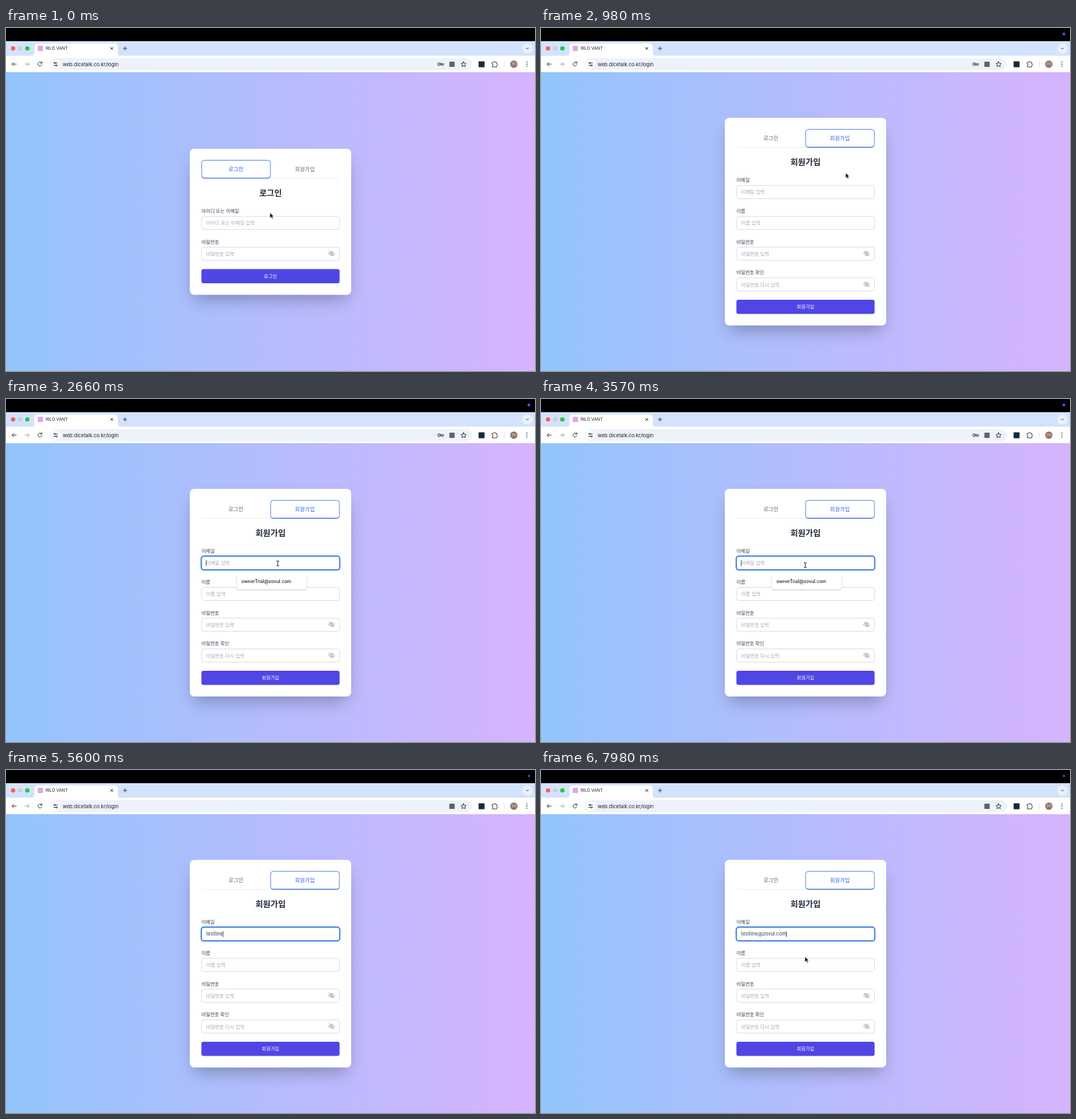
Animation, 800 px wide and 520 px high, one loop 8000 ms. Source, as an HTML page:

```html
<!DOCTYPE html>
<html lang="ko">
<head>
<meta charset="utf-8">
<title>Login</title>
<style>
  html, body { margin: 0; width: 100%; height: 100%; overflow: hidden; background: #000; }
  svg { display: block; width: 100vw; height: 100vh; }
  text { font-family: Inter, "Noto Sans CJK KR", "Noto Sans CJK", sans-serif; white-space: pre; }
  .icon { fill: none; stroke: #3c4043; stroke-width: 1; stroke-linecap: round; stroke-linejoin: round; }
</style>
</head>
<body>
<svg id="stage" viewBox="0 0 800 520"></svg>
<script>
const LOOP = 8000, STEP = 70;
const SWITCH = 980, FIRST_KEY = 4060, POINTER_BACK = 7700;
const FIELD_CLICKS = [1460, 3600];
const EMAIL = 'testline@zovul.com';
const KEY_TIMES = [4060, 4200, 4340, 4620, 5180, 5320, 5460, 5600, 5880,
                   6160, 6300, 6510, 6650, 6790, 7000, 7210, 7350, 7490];
// Pointer path: time, x, y
const PATH = [[70, 399, 280], [840, 460.5, 219.5], [980, 460.5, 219.5], [1470, 381.5, 251.3],
              [2100, 381.5, 251.3], [2660, 411, 249.2], [3710, 399, 252],
              [7630, 399, 252], [7980, 399, 283]];

const rect = (x, y, w, h, r, fill, extra = '') =>
  `<rect x="${x}" y="${y}" width="${w}" height="${h}" rx="${r}" fill="${fill}" ${extra}/>`;
const circle = (x, y, r, fill, extra = '') => `<circle cx="${x}" cy="${y}" r="${r}" fill="${fill}" ${extra}/>`;
const icon = (d, extra = '') => `<path class="icon" d="${d}" ${extra}/>`;
// Text is placed by the vertical middle of its letters.
const label = (str, x, y, size, fill, weight = 400, anchor = 'start', extra = '') =>
  `<text x="${x}" y="${y + size * .37}" font-size="${size}" fill="${fill}" font-weight="${weight}" text-anchor="${anchor}" ${extra}>${str}</text>`;

function browser() {
  return rect(0, 0, 800, 20, 0, '#000') +
    rect(0, 20, 800, 24, 0, '#d3e3fd') +
    circle(10.7, 31, 3.3, '#fe5f57') + circle(21.5, 31, 3.3, '#cfced8') + circle(32.3, 31, 3.3, '#28c840') +
    '<path d="M39 42Q43 42 43 38V28.500Q43 23.500 48 23.500H164Q169 23.500 169 28.500V38Q169 42 173 42Z" fill="#fff"/>' +
    rect(48, 27, 8, 8, 1, '#dfa6e6') +
    label('RILO VANT', 60, 31, 6.4, '#202124') +
    icon('M158.200 29.200l3.600 3.600m0-3.600l-3.600 3.600M177.300 31h5.400M180 28.300v5.400') +
    circle(788.5, 31, 7.7, '#e9f1fe') + icon('M786.700 30.200l1.800 1.800 1.800-1.800') +
    rect(0, 42, 800, 25, 0, '#fff') +
    icon('M15.500 54.800H9.200m2.800-2.800l-2.800 2.800 2.800 2.800') +
    icon('M28.700 54.800H35m-2.800-2.800l2.800 2.800-2.800 2.800', 'style="stroke:#a3a6ab"') +
    icon('M54 53a3 3 0 1 0 .3 2.600M54.200 51v2.200H52') +
    rect(66, 45.8, 639, 18, 9, '#edf2fb') +
    circle(75, 54.8, 7, '#fff') +
    icon('M72 53h.6m2.400 0h3M72 56.700h3m2.400 0h.6') +
    circle(73.8, 53, 1.1, 'none', 'class="icon"') + circle(76.3, 56.7, 1.1, 'none', 'class="icon"') +
    label('web.dicetalk.co.kr/login', 85.7, 54.8, 7.5, '#202124') +
    `<g id="key">${circle(655, 54.8, 2.2, 'none', 'class="icon"')}${circle(655, 54.8, .7, '#3c4043')}${icon('M657.400 54h4.400v1.600h-1v1.200h-1.800v-1.200h-1.600')}</g>` +
    rect(670.5, 51, 8, 8, 1, '#5f6368') +
    icon('M692 51l1.200 2.600 2.800.3-2.100 1.900.6 2.800-2.500-1.400-2.500 1.400.6-2.800-2.100-1.900 2.800-.3z') +
    rect(714.7, 50.5, 9, 9, .8, '#172b3a') +
    icon('M735.500 52h2.200a1.200 1.200 0 0 1 2.400 0h2v2.300a1.200 1.200 0 0 1 0 2.400V59h-6.600v-2.200a1.200 1.200 0 0 0 0-2.400z') +
    rect(753, 51, .8, 8, 0, '#cbdcf8') +
    circle(768, 54.8, 5.6, '#927469') + label('온비', 768, 54.8, 4.2, '#f3e9e4', 400, 'middle') +
    [51.6, 54.8, 58].map(y => circle(787.7, y, .85, '#3c4043')).join('');
}

const hiddenEye = y => icon(`M488 ${y}Q492.500 ${y - 6} 497 ${y}Q492.500 ${y + 6} 488 ${y}M488.500 ${y - 4}l8 8`,
  'style="stroke:#8b919c;stroke-width:.8"') + circle(492.5, y, 1.4, 'none', 'stroke="#8b919c" stroke-width=".8"');

function tab(name, x, top, active) {
  const text = (fill, weight) => label(name, x + 52.2, top + 14, 8.1, fill, weight, 'middle');
  if (!active) return rect(x, top + 27.3, 104.3, .7, 0, '#e2e4e9') + text('#636771', 500);
  return rect(x + .4, top + .3, 104, 27.2, 4, '#fff', 'stroke="#4a7bdc" stroke-width=".9"') +
    `<path d="M${x + 1} ${top + 25.4}q1 2 3.500 2h95.500q2.500 0 3.500-2" fill="none" stroke="#3a6fd9" stroke-width="1"/>` +
    text('#2563eb', 500);
}

function card(id, top, title, fields) {
  const height = 128 + fields.length * 46.7, buttonTop = top + 89 + fields.length * 46.7;
  let out = rect(284, top + 19.5, 232, height - 12, 6, '#000', 'opacity=".27" filter="url(#blur)"') +
    rect(278, top, 244, height, 6.5, '#fff') +
    tab('로그인', 295.5, top + 17.2, title === '로그인') +
    tab('회원가입', 399.8, top + 17.2, title === '회원가입') +
    label(title, 400, top + 67.2, 12.4, '#1f2937', 700, 'middle');
  fields.forEach(([name, hint], i) => {
    const y = top + 94.3 + i * 46.7;
    out += label(name, 295.7, y, 7.2, '#374151', 500) +
      rect(295.8, y + 8.3, 208.6, 20, 3.6, '#fff', 'stroke="#d1d5db" stroke-width=".8"') +
      label(hint, 302.7, y + 18.2, 7.3, '#a2a8b3', 400, 'start', i ? '' : `id="${id}Hint"`);
    if (name.startsWith('비밀번호')) out += hiddenEye(y + 18);
  });
  return `<g id="${id}">${out}` + rect(295.5, buttonTop, 209, 21.6, 3.3, '#4f46e5') +
    label(title, 400, buttonTop + 10.8, 7.2, '#fff', 500, 'middle') + '</g>';
}

const stage = document.getElementById('stage');
stage.innerHTML = `
  <defs>
    <linearGradient id="sky"><stop stop-color="#93c5fd"/><stop offset="1" stop-color="#d6b3fe"/></linearGradient>
    <filter id="blur" x="-30%" y="-30%" width="160%" height="160%"><feGaussianBlur stdDeviation="13"/></filter>
    <filter id="soft" x="-20%" y="-30%" width="140%" height="170%"><feDropShadow dx="0" dy="1" stdDeviation="1.3" flood-opacity=".3"/></filter>
  </defs>
  ${rect(0, 67, 800, 453, 0, 'url(#sky)')}
  ${browser()}
  ${circle(790.8, 9, 2.2, '#5844ee', 'id="dot"')}
  ${card('login', 183, '로그인', [['아이디 또는 이메일', '아이디 또는 이메일 입력'], ['비밀번호', '비밀번호 입력']])}
  <g id="hover">
    ${rect(400.4, 200.6, 103.7, 27, 4, '#fff', 'stroke="#1c68c0" stroke-width="1.3"')}
    ${label('회원가입', 452, 214.2, 8.1, '#4b5563', 500, 'middle')}
  </g>
  ${card('signup', 136.2, '회원가입', [['이메일', '이메일 입력'], ['이름', '이름 입력'],
    ['비밀번호', '비밀번호 입력'], ['비밀번호 확인', '비밀번호 다시 입력']])}
  <g id="focus">
    ${rect(295.3, 238.2, 209.4, 21, 3.8, 'none', 'stroke="#3576e6" stroke-width="1.8"')}
    ${label('', 302.7, 248.7, 7.4, '#374151', 400, 'start', 'id="typed"')}
    ${rect(302.5, 244.3, .8, 9, 0, '#222', 'id="caret"')}
  </g>
  <g id="suggestion">
    ${rect(349.3, 263, 105, 25.3, 3, '#fff', 'filter="url(#soft)"')}
    ${rect(346, 260.5, 112, 5.5, 0, '#fff')}
    ${label('ownerTrial@zovul.com', 356, 276, 6.9, '#202124', 500)}
  </g>
  <g id="pointer" stroke-linejoin="round" stroke-linecap="round">
    <path id="arrow" d="M0 0V8.200L2 6.500 3.400 9.600 4.900 8.900 3.600 5.900H6.200Z" fill="#111" stroke="#fff" stroke-width=".7"/>
    <path id="hand" d="M-.900 .6Q-.900-.3 0-.3T.9.6V3.300L4 4Q4.800 4.300 4.600 5.400L3.900 9.200H-.3L-2.500 6Q-2.800 5-1.600 5.100L-.9 5.700Z" fill="#fff" stroke="#222" stroke-width=".8"/>
    <path id="beam" d="M-1.700-3.800Q0-3.800 0-2.800 0-3.800 1.700-3.800M0-2.800V2.800M-1.700 3.800Q0 3.800 0 2.800 0 3.800 1.700 3.800" fill="none" stroke="#222" stroke-width="1"/>
  </g>`;

const el = Object.fromEntries([...stage.querySelectorAll('[id]')].map(node => [node.id, node]));
const show = (node, on) => node.setAttribute('visibility', on ? 'visible' : 'hidden');
const inside = ([x, y], left, top, right, bottom) => x > left && x < right && y > top && y < bottom;

function pointerAt(t) {
  const i = PATH.findIndex(key => key[0] > t);
  if (i === 0) return PATH[0].slice(1);
  if (i < 0) return PATH.at(-1).slice(1);
  const [t0, x0, y0] = PATH[i - 1], [t1, x1, y1] = PATH[i];
  const p = (t - t0) / (t1 - t0), e = p * p * (3 - 2 * p);
  return [x0 + (x1 - x0) * e, y0 + (y1 - y0) * e];
}

function draw(now) {
  const t = Math.floor(now % LOOP / STEP) * STEP;
  const signup = t >= SWITCH, focused = t >= FIELD_CLICKS[0];
  const count = KEY_TIMES.filter(k => k <= t).length;
  const pos = pointerAt(t);
  const overTab = !signup && inside(pos, 400, 200, 504, 228);
  const overField = signup && inside(pos, 295, 238, 505, 259.5);

  show(el.login, !signup);
  show(el.signup, signup);
  show(el.hover, overTab);
  show(el.focus, focused);
  show(el.suggestion, focused && !count);
  show(el.key, t < FIRST_KEY);
  show(el.dot, t >= STEP);
  el.dot.setAttribute('r', t < FIRST_KEY ? 2.2 : 1.7);

  el.typed.textContent = EMAIL.slice(0, count);
  show(el.signupHint, signup && !count);
  el.caret.setAttribute('x', 302.5 + (count ? el.typed.getComputedTextLength() : 0));
  // Every click or key restarts the blink.
  const lastInput = [...FIELD_CLICKS, ...KEY_TIMES].filter(k => k <= t).at(-1);
  show(el.caret, focused && Math.floor((t - lastInput) / 500) % 2 === 0);

  const visible = t < FIRST_KEY || t >= POINTER_BACK;
  show(el.arrow, visible && !overTab && !overField);
  show(el.hand, visible && overTab);
  show(el.beam, visible && overField);
  el.pointer.setAttribute('transform', `translate(${pos})`);
}

function tick() {
  draw(performance.now());
  requestAnimationFrame(tick);
}
tick();
</script>
</body>
</html>
```
